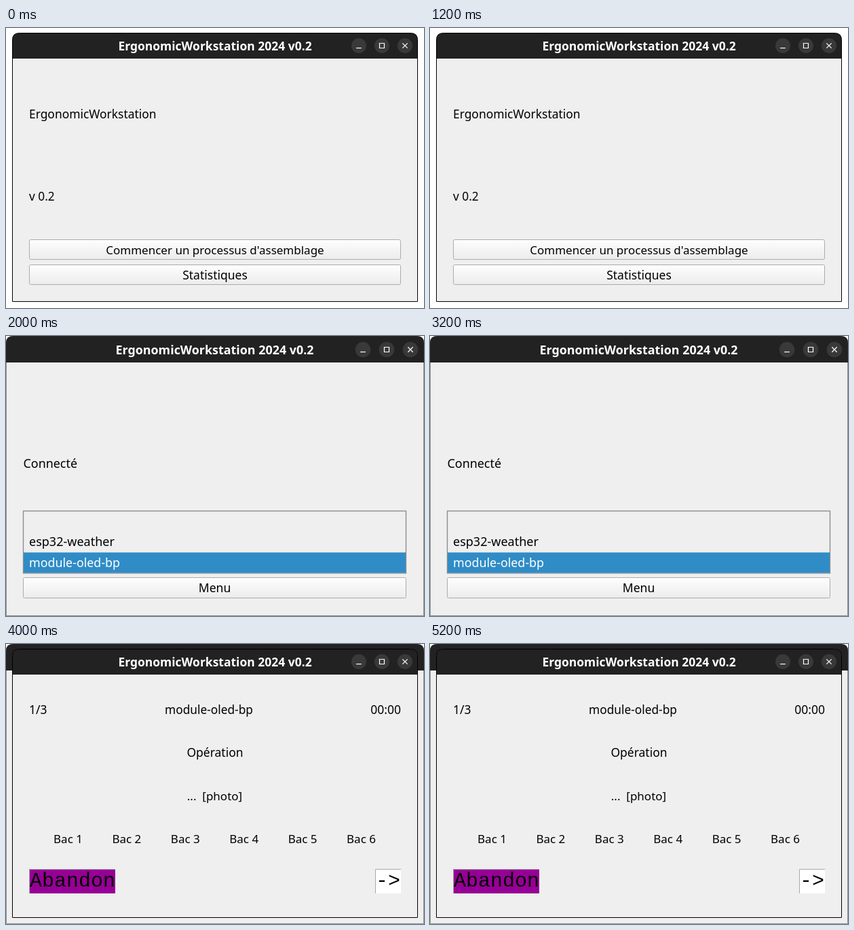
Recreate the animation shown at these times as an HTML page. Size 616 by 412 pixels, loop 6000 ms.

```html
<!DOCTYPE html>
<html lang="fr">
<head>
<meta charset="utf-8">
<title>ErgonomicWorkstation</title>
<style>
  html, body { margin: 0; width: 100%; height: 100%; overflow: hidden; background: #fff; }
  svg { display: block; width: 616px; height: 412px; }
  text { font-family: "Noto Sans", "Open Sans", sans-serif; fill: #000; white-space: pre; }
  .mono { font-family: "Liberation Mono", monospace; }
</style>
</head>
<body>
<svg id="stage" viewBox="0 0 616 412" xmlns="http://www.w3.org/2000/svg">
  <defs>
    <linearGradient id="face" x1="0" y1="0" x2="0" y2="1">
      <stop offset="0" stop-color="#fefefe"/>
      <stop offset="1" stop-color="#ececec"/>
    </linearGradient>
  </defs>
</svg>
<script>
const NS = "http://www.w3.org/2000/svg";
const stage = document.getElementById("stage");
const SCENE_MS = 2000;
const TITLE = "ErgonomicWorkstation 2024 v0.2";

function add(parent, tag, attrs, content) {
  const el = document.createElementNS(NS, tag);
  for (const key in attrs) el.setAttribute(key, attrs[key]);
  if (content) el.textContent = content;
  parent.appendChild(el);
  return el;
}

const group = parent => add(parent, "g", {});

function label(g, x, y, content, size = 17.3, anchor = "start", extra = {}) {
  return add(g, "text", { x, y, "font-size": size, "text-anchor": anchor, ...extra }, content);
}

function rect(g, x, y, width, height, fill, extra = {}) {
  return add(g, "rect", { x, y, width, height, fill, ...extra });
}

function button(g, x, y, w, h, content, baseline, size) {
  rect(g, x + .5, y + .5, w - 1, h - 1, "url(#face)", { rx: 2, stroke: "#ababab" });
  label(g, x + w / 2, baseline, content, size, "middle");
}

function controls(g, xs, y, k) {
  const line = { fill: "none", stroke: "#fff", "stroke-width": 1.2 * k };
  xs.forEach((x, i) => {
    add(g, "circle", { cx: x, cy: y, r: 11 * k, fill: "#393939" });
    const icon = [
      "M-3.8 3.5H3.8",
      "M-3.5 -3.5H3.5V3.5H-3.5Z",
      "M-3.7 -3.7L3.7 3.7M3.7 -3.7L-3.7 3.7"
    ][i];
    add(g, "path", { d: icon, transform: `translate(${x} ${y})`, ...line });
  });
}

// Window outline with rounded top corners
function shape(x, y, w, h, r) {
  return `M${x} ${y + h}V${y + r}Q${x} ${y} ${x + r} ${y}H${x + w - r}` +
         `Q${x + w} ${y} ${x + w} ${y + r}V${y + h}Z`;
}

function smallWindow(g) {
  add(g, "path", { d: shape(9.5, 7.5, 597, 395, 10), fill: "#efefef" });
  add(g, "path", { d: shape(9.5, 7.5, 597, 37.5, 10), fill: "#222" });
  add(g, "path", { d: shape(9.5, 7.5, 597, 395, 10), fill: "none", stroke: "#000" });
  label(g, 308, 33, TITLE, 17.48, "middle", { "font-weight": 700, style: "fill:#fff" });
  controls(g, [520, 554, 588], 26, 1);
}

function largeFrame(g) {
  add(g, "path", { d: shape(.5, .5, 615, 411, 10), fill: "#efefef", stroke: "#8c8c8c" });
  add(g, "path", { d: shape(0, 0, 616, 39, 10), fill: "#222" });
  add(g, "path", { d: "M1 39.5H615", stroke: "#f8f8f8" });
}

function home(g) {
  smallWindow(g);
  label(g, 34, 133, "ErgonomicWorkstation", 17.4);
  label(g, 34, 254, "v 0.2");
  button(g, 34, 311, 548, 30, "Commencer un processus d'assemblage", 333, 17);
  button(g, 34, 348, 548, 30, "Statistiques", 370, 17.5);
}

function picker(g) {
  largeFrame(g);
  label(g, 307.5, 27, TITLE, 17.9, "middle", { "font-weight": 700, style: "fill:#fff" });
  controls(g, [526, 561, 596], 20, 1.03);
  label(g, 25.5, 194, "Connecté", 17.9);
  rect(g, 25.5, 257.5, 564, 91.5, "#efefef", { stroke: "#8e8e8e", "stroke-width": 1.4 });
  rect(g, 26, 318.5, 563, 30, "#308cc6");
  label(g, 34, 309, "esp32-weather", 18);
  label(g, 34, 340, "module-oled-bp", 17.85, "start", { style: "fill:#fff" });
  button(g, 25, 355, 565, 31, "Menu", 377, 17.6);
}

function assembly(g) {
  largeFrame(g);
  smallWindow(g);
  label(g, 34, 103, "1/3", 17.5);
  label(g, 299, 103, "module-oled-bp", 17.3, "middle");
  label(g, 582, 103, "00:00", 17.5, "end");
  label(g, 308, 166, "Opération", 17.5, "middle");
  label(g, 307.5, 230, "...  [photo]", 17, "middle");
  for (let i = 0; i < 6; i++) label(g, 91.5 + 86.4 * i, 293, `Bac ${i + 1}`, 17, "middle");
  for (const [x, w, fill, content] of [[34, 127, "#960096", "Abandon"], [544, 38, "#fff", "->"]]) {
    rect(g, x, 331, w, 36, fill);
    add(g, "path", { d: `M${x + .5} 367V331.5H${x + w}`, fill: "none", stroke: "#a8a8a8" });
    label(g, x + 1, 357, content, 30, "start", { class: "mono" });
  }
}

const scenes = [home, picker, assembly].map(draw => {
  const g = group(stage);
  draw(g);
  return g;
});

function render(ms) {
  const current = Math.floor(ms / SCENE_MS) % scenes.length;
  scenes.forEach((g, i) => g.setAttribute("visibility", i === current ? "visible" : "hidden"));
}

const start = performance.now();
function tick() {
  render(performance.now() - start);
  requestAnimationFrame(tick);
}
render(0);
requestAnimationFrame(tick);
</script>
</body>
</html>
```
